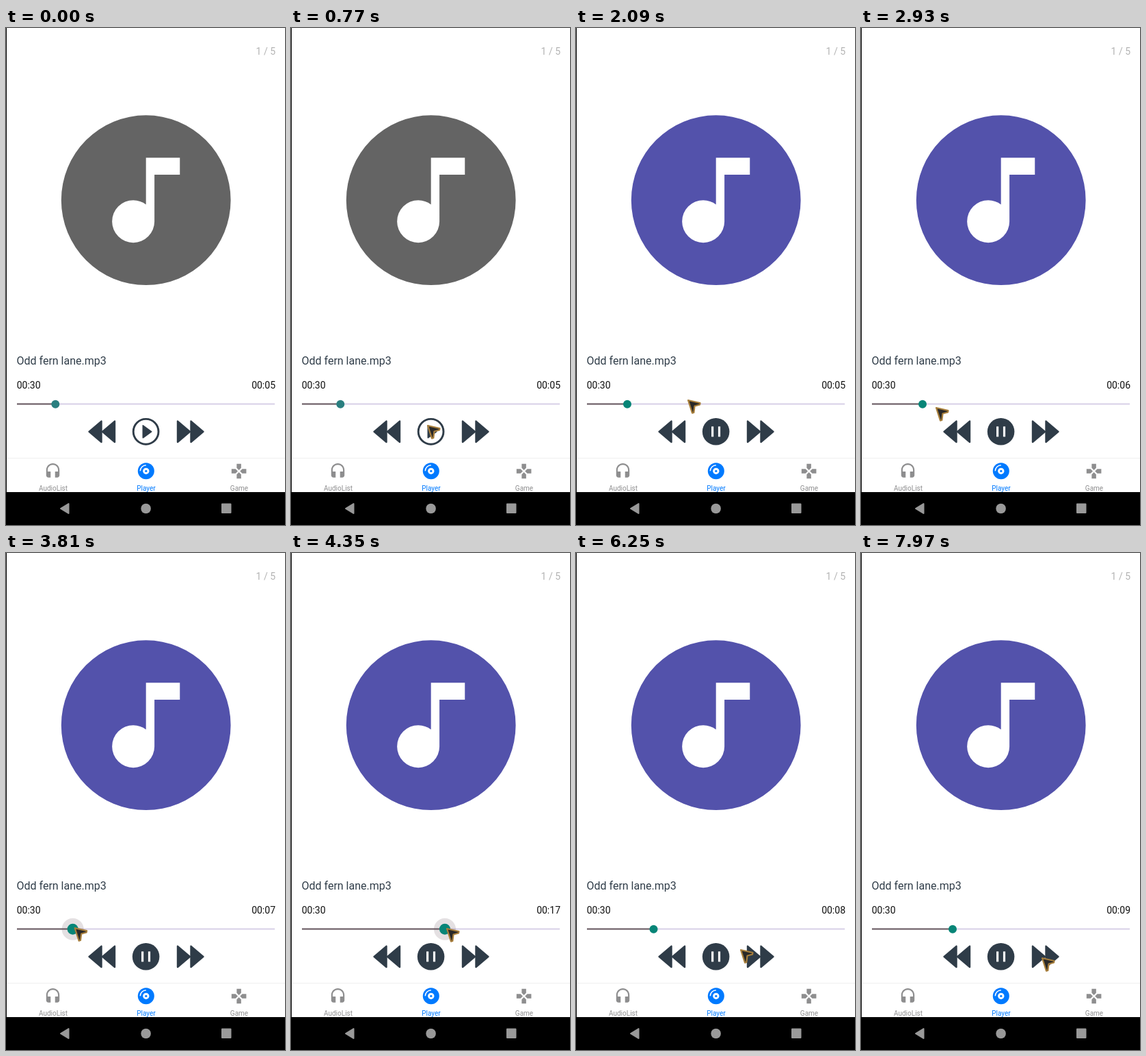
An HTML page with a canvas that plays this animation: 408x725 px, repeating every 8 s.

```html
<!DOCTYPE html>
<html lang="en">
<head>
<meta charset="utf-8">
<title>Audio player</title>
<style>
  html, body { margin: 0; width: 100%; height: 100%; overflow: hidden; background: #fff; }
  canvas { display: block; width: 408px; height: 725px; }
</style>
</head>
<body>
<canvas id="stage"></canvas>
<script>
const W = 408, H = 725, LOOP = 8000;
const INK = '#2f3c48', GREY = '#8e8e8f', BLUE = '#007aff', NAV = '#999';
const PLAY = 1550, GRAB = 3720, DROP = 4400, REGRAB = 5380, RELEASE = 5950;

const canvas = document.getElementById('stage');
const ctx = canvas.getContext('2d');
const dpr = window.devicePixelRatio || 1;
canvas.width = W * dpr;
canvas.height = H * dpr;

// Pointer moves, each eased from where the last one ended
const ENTER = { x: 290, y: 689 };
const MOVES = [
  { from: 70, to: 700, x: 199, y: 579 },
  { from: PLAY, to: 2090, x: 163, y: 542 },
  { from: 2240, to: 2930, x: 109, y: 553 },
  { from: 2930, to: 3500, x: 92, y: 546 },
  { from: GRAB, to: 4350, x: 227, y: 547 },
  { from: REGRAB, to: 5850, x: 115.5, y: 548 },
  { from: 6000, to: 6250, x: 240, y: 578 },
  { from: 6250, to: 6480, x: 269, y: 595 },
  { from: 6630, to: 6940, x: 264, y: 590 }
];

const ICONS = {
  note: new Path2D('M12 2a10 10 0 1 0 0 20 10 10 0 0 0 0-20zM16 9h-3v5.5a2.5 2.5 0 1 1-2.5-2.5c.57 0 1.08.19 1.5.5V7h4z'),
  headset: new Path2D('M12 1c-4.97 0-9 4.03-9 9v7c0 1.66 1.34 3 3 3h3v-8H5v-2c0-3.87 3.13-7 7-7s7 3.13 7 7v2h-4v8h3c1.66 0 3-1.34 3-3v-7c0-4.97-4.03-9-9-9z'),
  pad: new Path2D('M15 7.5V2H9v5.5l3 3zM7.5 9H2v6h5.5l3-3zM9 16.5V22h6v-5.5l-3-3zM16.5 9l-3 3 3 3H22V9z')
};

const clamp = v => Math.min(1, Math.max(0, v));
const ease = p => p * p * (3 - 2 * p);

function pointerAt(t) {
  let { x, y } = ENTER;
  for (const m of MOVES) {
    const p = ease(clamp((t - m.from) / (m.to - m.from)));
    x += (m.x - x) * p;
    y += (m.y - y) * p;
  }
  return { x, y };
}

const isHeld = t => (t >= GRAB + 70 && t < DROP) || (t >= REGRAB && t < RELEASE);

// The thumb follows the pointer while dragged, else steps with playback
function thumbAt(t) {
  if (t < PLAY + 230) return 72.3;
  if (t < GRAB) return t < 2400 ? 75 : 90;
  if (t < RELEASE) return pointerAt(t).x - 2;
  return Math.max(113.5, 107 + 9 * Math.floor((t - RELEASE) / 670));
}

function rect(x, y, w, h, color) {
  ctx.fillStyle = color;
  ctx.fillRect(x, y, w, h);
}

function disc(x, y, r, color) {
  ctx.fillStyle = color;
  ctx.beginPath();
  ctx.arc(x, y, r, 0, Math.PI * 2);
  ctx.fill();
}

function ring(x, y, r, width, color, from = 0, to = Math.PI * 2) {
  ctx.strokeStyle = color;
  ctx.lineWidth = width;
  ctx.beginPath();
  ctx.arc(x, y, r, from, to);
  ctx.stroke();
}

function poly(points, fill, stroke, width) {
  ctx.beginPath();
  points.forEach(([x, y]) => ctx.lineTo(x, y));
  ctx.closePath();
  ctx.lineJoin = 'round';
  ctx.lineWidth = width;
  ctx.fillStyle = fill;
  ctx.strokeStyle = stroke;
  ctx.fill();
  ctx.stroke();
}

function icon(path, x, y, scale, color) {
  ctx.save();
  ctx.translate(x, y);
  ctx.scale(scale, scale);
  ctx.translate(-12, -12);
  ctx.fillStyle = color;
  ctx.fill(path, 'evenodd');
  ctx.restore();
}

function text(str, x, y, size, color, align = 'left') {
  ctx.font = size + 'px Roboto, sans-serif';
  ctx.textAlign = align;
  ctx.fillStyle = color;
  ctx.fillText(str, x, y);
}

// Double triangle; dir -1 points left, 1 points right
function skip(x, dir) {
  for (const off of [0, 19.5]) {
    const tip = x - dir * (off + 1);
    const base = tip - dir * 18;
    poly([[tip, 588.8], [base, 573.6], [base, 604]], INK, INK, 2.4);
  }
}

function drawControls(playing) {
  skip(120.5, -1);
  skip(289.5, 1);
  if (playing) {
    disc(204.6, 588.8, 19.8, INK);
    for (const x of [198, 207.9]) rect(x, 581.3, 3.2, 15, '#fff');
  } else {
    ring(204.6, 588.8, 18.4, 2.9, INK);
    poly([[200.3, 579.8], [200.3, 597.8], [212.7, 588.8]], INK, INK, 1.6);
  }
}

function drawSlider(x, held, color) {
  rect(16, 547.5, 377, 2, '#d7d0e7');
  rect(16, 547.5, x - 16, 2, '#6a5d60');
  if (held) disc(x, 548.7, 16, 'rgba(95, 75, 85, 0.17)');
  disc(x, 548.7, held ? 8 : 6, color);
}

function drawTabs() {
  rect(1, 627, W - 1, 1, '#efefef');
  icon(ICONS.headset, 68.5, 647, 1.08, GREY);
  disc(204.8, 646.3, 12, BLUE);
  disc(204.8, 646.3, 4.65, '#fff');
  disc(204.8, 646.3, 1.6, BLUE);
  ring(204.8, 646.3, 8.5, 1.55, '#fff', Math.PI, Math.PI * 1.5);
  icon(ICONS.pad, 340.6, 646.5, 1.08, GREY);
  text('AudioList', 69, 674.5, 10, GREY, 'center');
  text('Player', 205, 674.5, 10, BLUE, 'center');
  text('Game', 341, 674.5, 10, GREY, 'center');
}

function drawNav() {
  rect(0, 677, W, 48, '#000');
  poly([[80, 701], [91.5, 694], [91.5, 708]], NAV, NAV, 2);
  disc(204.6, 701, 7.3, NAV);
  poly([[316, 694.5], [328.5, 694.5], [328.5, 707], [316, 707]], NAV, NAV, 2);
}

function drawPointer(t) {
  if (t < MOVES[0].from) return;
  const { x, y } = pointerAt(t);
  const shape = [[1, 1], [18.5, 5], [18, 7.5], [10.5, 9.5], [9.3, 19], [7, 19.7]];
  poly(shape.map(([dx, dy]) => [x + dx, y + dy]), '#2a2928', '#a87f3c', 2.2);
}

function draw(t) {
  const playing = t >= PLAY;
  const x = thumbAt(t);
  const seconds = Math.round((x - 16) / 377 * 30 + 0.06);

  ctx.setTransform(dpr, 0, 0, dpr, 0, 0);
  rect(0, 0, W, H, '#fff');
  rect(0, 0, 1, H, '#000');
  text('1 / 5', 394, 38.7, 14, '#b3b3b3', 'right');
  icon(ICONS.note, 204.7, 251.2, 12.39, playing ? '#5352ab' : '#646464');
  text('Odd fern lane.mp3', 15.5, 491, 16, '#303d49');
  text('00:30', 15.7, 525.8, 14, '#111');
  text('00:' + String(seconds).padStart(2, '0'), 394, 525.8, 14, '#111', 'right');
  drawSlider(x, isHeld(t), playing ? '#078577' : '#2a7f80');
  drawControls(playing);
  drawTabs();
  drawNav();
  drawPointer(t);
}

const start = performance.now();
function tick() {
  draw((performance.now() - start) % LOOP);
  requestAnimationFrame(tick);
}
tick();
</script>
</body>
</html>
```
